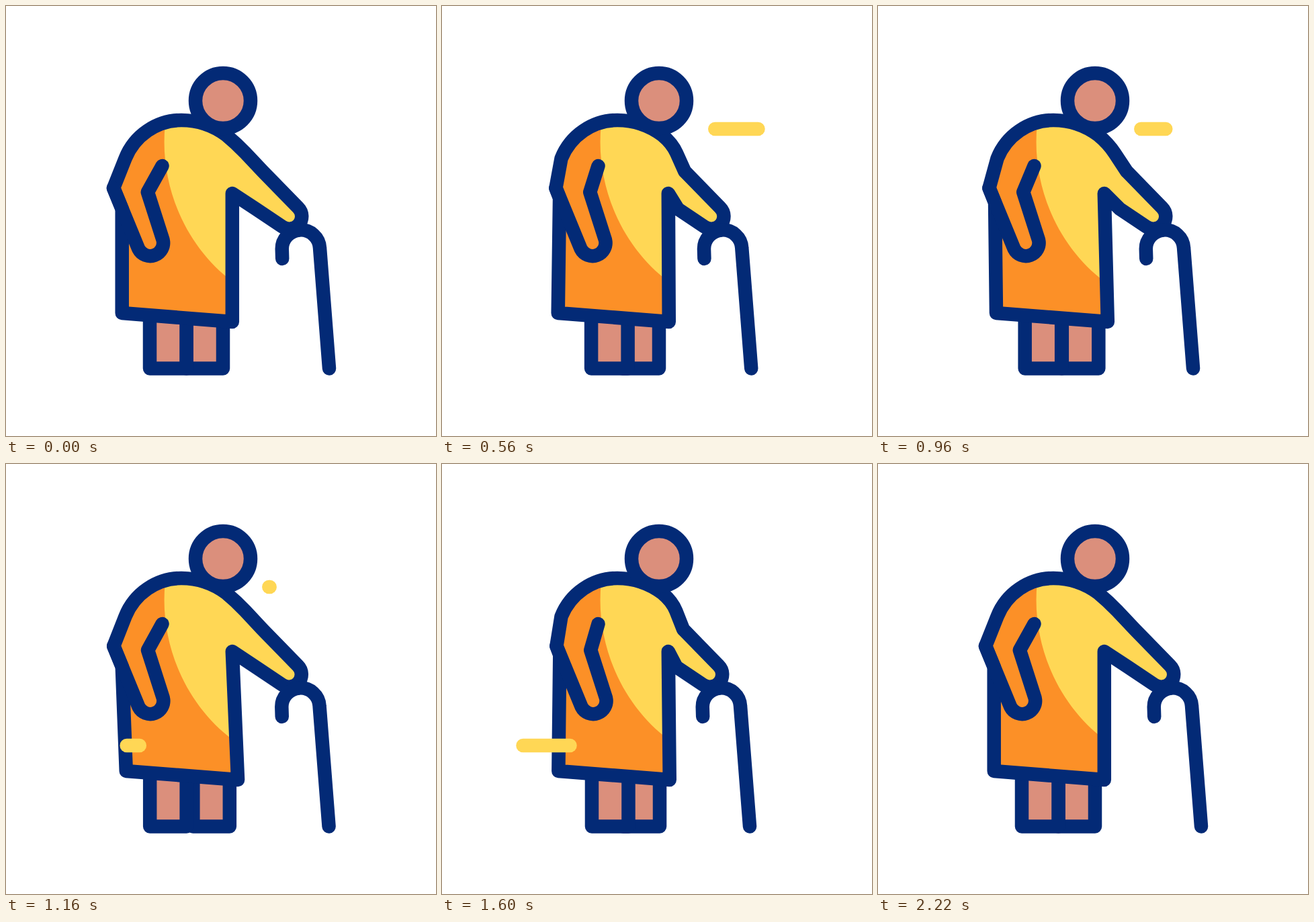
These frames come from a looping animation (640 px wide and 640 px high, 2400 ms). An HTML page:

```html
<!DOCTYPE html>
<html lang="en">
<head>
<meta charset="utf-8">
<title>Walking with a cane</title>
<style>
  html, body { margin: 0; width: 100%; height: 100%; overflow: hidden; background: #fff; }
  svg { display: block; width: 100%; height: 100%; }
  .ink { stroke: #032a76; stroke-width: 20.5; stroke-linecap: round; stroke-linejoin: round; fill: none; }
  .skin { fill: #db8f7c; }
  .dash { stroke: #ffd755; stroke-width: 20.5; stroke-linecap: round; }
</style>
</head>
<body>
<svg viewBox="0 0 640 640">
  <defs><clipPath id="clip"><path id="clipShape"/></clipPath></defs>
  <path id="frontLeg" class="ink skin" d="M268.5 464V539.5H323V464"/>
  <path id="rearLeg" class="ink skin" d="M214 464V539.5H268.5V464"/>
  <path id="fill" fill="#fc9027"/>
  <path clip-path="url(#clip)" fill="#ffd755" d="M237 175C227 270 270 360 337 410L360 425H480V150H238Z"/>
  <path id="outline" class="ink"/>
  <path id="arm" class="ink"/>
  <path id="cane" class="ink" d="M411.2 376L410.8 363A28 28 0 0 1 467 360L481 539.5"/>
  <circle class="ink skin" cx="323" cy="141" r="41"/>
  <line id="dashA" class="dash" y1="183" y2="183"/>
  <line id="dashB" class="dash" y1="419" y2="419"/>
</svg>
<script>
const LOOP = 2400;
const STOPS = [200, 700, 1200, 1700, 2200];
const $ = id => document.getElementById(id);

// Smooth ease from 0 to 1 between two times
function ease(t, from, to) {
  const u = Math.min(1, Math.max(0, (t - from) / (to - from)));
  return u * u * (3 - 2 * u);
}

// Eased value through one key per stop
function track(t, keys) {
  let v = keys[0];
  for (let i = 1; i < keys.length; i++) {
    v += (keys[i] - keys[i - 1]) * ease(t, STOPS[i - 1], STOPS[i]);
  }
  return v;
}

const shift = (id, dx) => $(id).setAttribute('transform', `translate(${dx} 0)`);

function bodyPath(reach, elbow, sideX, sideY, hemL, hemR) {
  const ex = 382 - reach, sx = 342.5, sy = 204.2;
  const bendX = sx + (ex - sx) * 0.35, bendY = sy + (246 - sy) * 0.35;
  return `M177.5 227C191 193 224 170 261 170C285 170 308.4 177.7 328 192.3` +
    `Q${sx} ${sy} ${bendX} ${bendY}L${ex} 246L${434.8 - reach} 300.1` +
    `A18.5 18.5 0 0 1 ${411.2 - reach} 328.4L${371.8 - reach} 302` +
    `L336.8 279L${hemR} 470L${hemL} 457L${sideX} ${sideY}L${160 + elbow} 271Z`;
}

function armPath(dx) {
  return `M${160 + dx} 271L${197.2 + dx} 361.4A19.5 19.5 0 0 0 ${233.6 + dx} 348.2` +
    `L${210.8 + dx} 277L232.5 238`;
}

// A dash grows from its start, then its tail catches up
function drawDash(id, t, begin, x0, x1) {
  const el = $(id);
  const at = p => x0 + (x1 - x0) * p;
  el.setAttribute('x1', at(ease(t, begin, begin + 500)));
  el.setAttribute('x2', at(ease(t, begin + 500, begin + 1000)));
  el.style.display = t > begin && t < begin + 1000 ? '' : 'none';
}

function draw(t) {
  const swing = track(t, [0, 1, 0, 1, 0]);
  const step = track(t, [0, 0, 1, 0, 0]);
  const reach = 25.6 * swing, elbow = 11.6 * swing;

  shift('rearLeg', 10 * swing);
  shift('frontLeg', 10 * step);
  shift('cane', -reach);

  const body = bodyPath(reach, elbow, 172.7 + 2.9 * swing, 302 - 20 * swing,
    172.7 + 6.2 * step, track(t, [336.8, 338, 345.2, 338, 336.8]));
  for (const id of ['fill', 'clipShape', 'outline']) $(id).setAttribute('d', body);
  $('arm').setAttribute('d', armPath(elbow));

  drawDash('dashA', t, 200, 470.5, 391.3);
  drawDash('dashB', t, 1000, 198.8, 120.5);
}

const start = performance.now();
function tick() {
  draw((performance.now() - start) % LOOP);
  requestAnimationFrame(tick);
}
draw(0);
requestAnimationFrame(tick);
</script>
</body>
</html>
```
